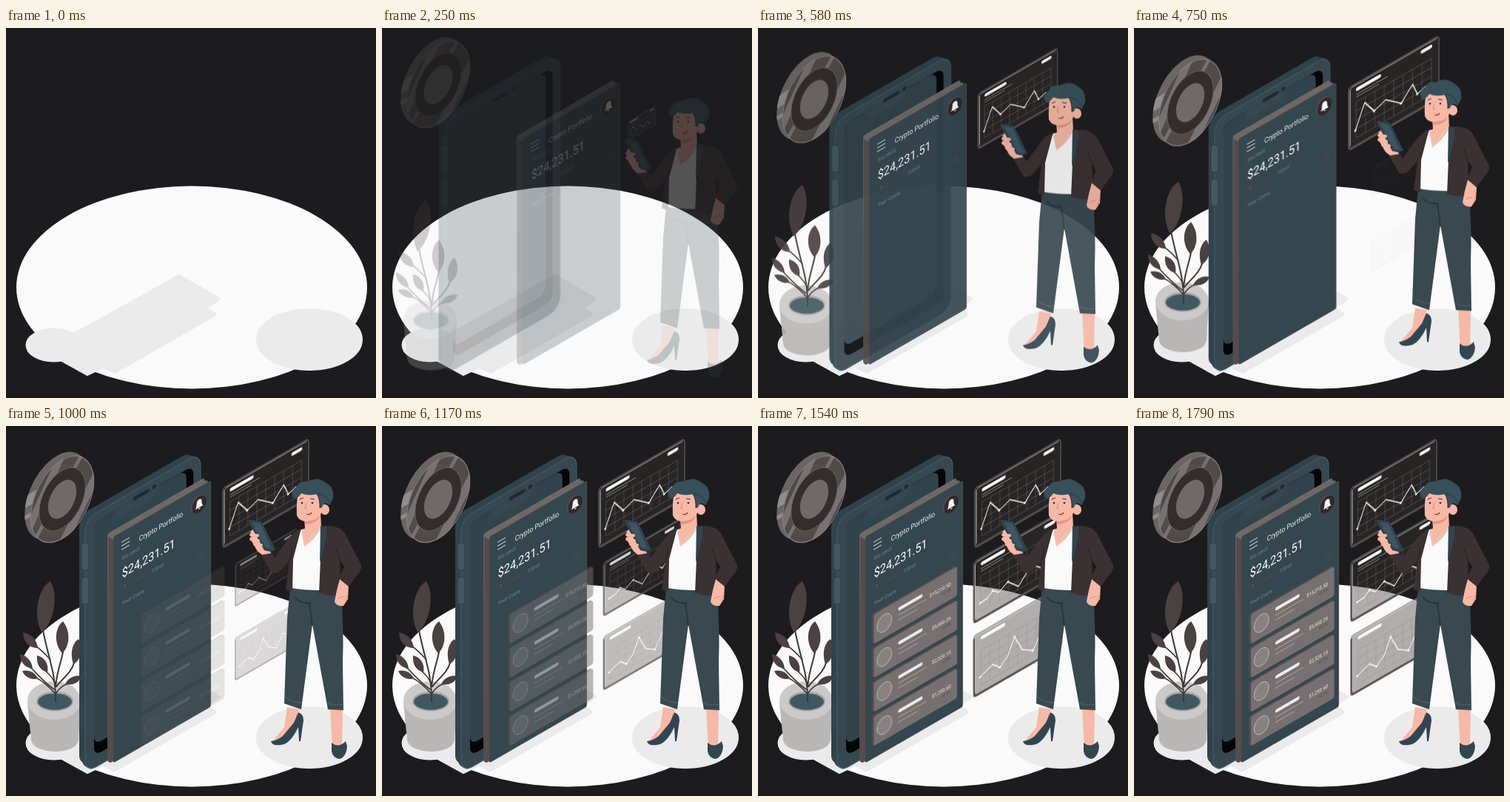
Recreate the animation shown at these times as an HTML page. Size 500x500 px, loop 1830 ms.

```html
<!DOCTYPE html>
<html lang="en">
<head>
<meta charset="utf-8">
<title>Crypto portfolio</title>
<style>
html, body { margin: 0; height: 100%; overflow: hidden; background: #1c1c1e; }
svg { display: block; width: 100vw; height: 100vh; }
text { font-family: Roboto, "Open Sans", sans-serif; }
.enter, .chart-in, .rows-in { animation: enter 1.83s cubic-bezier(.36,-.01,.5,1.38) infinite; }
.chart-in { animation-name: chart-in; }
.rows-in { animation-name: rows-in; }
.up { --from: translate(0, 30px); }
.down { --from: translate(0, -30px); }
.left { --from: translate(-30px, 0); }
.right { --from: translate(60px, 0); }
.rows-in { --from: translate(30px, 0); }
.rise { --from: translate(0, 50px) scale(.1); }
.chart-in { --from: scale(.5); }
@keyframes enter {
  0% { opacity: 0; transform: var(--from); }
  52.5%, 100% { opacity: 1; transform: none; }
}
@keyframes chart-in {
  0%, 35.5% { opacity: 0; transform: var(--from); }
  90%, 100% { opacity: 1; transform: none; }
}
@keyframes rows-in {
  0%, 42.9% { opacity: 0; transform: var(--from); }
  97.5%, 100% { opacity: 1; transform: none; }
}
</style>
</head>
<body>
<svg viewBox="0 0 500 500" preserveAspectRatio="none">
  <rect width="500" height="500" fill="#1c1c1e"/>
  <ellipse cx="251" cy="350.5" rx="237" ry="137" fill="#fafafa"/>
  <g fill="#ebebeb" stroke="#ebebeb" stroke-width="4" stroke-linejoin="round">
    <path d="M234 335 288 366 270 378 283 387 147 465 131 458 110 468 72 447 92 414Z"/>
    <ellipse cx="410" cy="421" rx="70" ry="40"/>
    <ellipse cx="64.500" cy="428.500" rx="36" ry="21"/>
  </g>

  <g class="enter up" id="plant">
    <path d="M29 374 34 424C36 444 95 446 98 424L101 374Z" fill="#b9b7b6"/>
    <ellipse cx="65" cy="371" rx="36" ry="26" fill="#cccac9"/>
    <ellipse cx="66" cy="372" rx="25" ry="13.500" fill="#a9a6a5"/>
    <ellipse cx="66" cy="372.500" rx="23" ry="11" fill="#425860"/>
    <g fill="none" stroke="#40393a" stroke-width="2" stroke-linecap="round">
      <path d="M67 373C68 335 56 310 50 276M67 352C69 330 75 318 77 305M68 352C78 340 89 332 92 320"/>
      <path d="M60 316C53 308 47 302 41 298M66 347C62 338 57 335 54 331M65 356C50 345 40 333 33 326M66 361C54 348 47 343 40 340M67 362C73 352 79 350 84 348" stroke-width="1.600"/>
    </g>
    <g fill="#4a4141">
      <path d="M48 279C34 250 47 215 60 210C70 224 67 264 48 279Z"/>
      <path d="M76 307C64 294 66 272 77 264C88 278 86 298 76 307Z"/>
      <path d="M91 322C86 306 90 293 98 288C106 302 101 316 91 322Z"/>
      <path d="M43 300C30 300 23 290 23 279C36 282 42 290 43 300Z"/>
      <path d="M56 333C45 330 41 321 42 310C53 313 58 322 56 333Z"/>
      <path d="M36 328C25 327 19 318 19 308C29 311 35 318 36 328Z"/>
      <path d="M43 341C34 344 25 339 22 331C32 329 39 333 43 341Z"/>
      <path d="M80 349C84 340 93 336 102 338C99 347 90 351 80 349Z"/>
    </g>
  </g>

  <g class="enter down" id="coin">
    <clipPath id="rim"><circle r="54"/></clipPath>
    <g transform="matrix(.8 -.46 0 1 68.500 94.500)">
      <circle r="54" fill="#6b6665"/>
      <path clip-path="url(#rim)" d="M-60-24H0V-8H-60ZM-60 2H0V8H-60Z" fill="#918d8c"/>
    </g>
    <g transform="matrix(.8 -.46 0 1 76 99)">
      <circle r="53.500" fill="#504a49"/>
      <g clip-path="url(#rim)" fill="#777271">
        <path d="M-60 6-10-60H8L-60 30ZM-60 42 44-60 49-56-60 52ZM-10 60 60-20V4L12 60Z"/>
      </g>
      <circle r="53" fill="none" stroke="#8d8887"/>
      <circle r="39" fill="#332d2d" stroke="#686261"/>
      <circle r="24" fill="#6f6a69"/>
    </g>
  </g>

  <g class="enter left" id="phone">
    <g transform="matrix(.866 -.5 0 1 99 121)">
      <rect width="178" height="341" rx="17" fill="#30434c"/>
    </g>
    <g transform="matrix(.866 -.5 0 1 103 123.500)">
      <rect width="180" height="344" rx="17" fill="#30434c"/>
    </g>
    <g transform="matrix(.866 -.5 0 1 107 126)">
      <rect width="180" height="343" rx="17" fill="#37474f" stroke="#425861" stroke-width="1.500"/>
    </g>
    <g fill="#425861" stroke="#263840" stroke-width=".8">
      <rect x="102" y="158" width="10" height="37" rx="4.500"/>
      <rect x="102" y="204" width="10" height="37" rx="4.500"/>
    </g>
    <g transform="matrix(.866 -.5 0 1 119 131)">
      <rect width="155" height="315" rx="11" fill="#050607"/>
      <rect width="144" height="300" rx="11" fill="#31434b"/>
      <path d="M32 0H100L94 9Q92 12 88 12H44Q40 12 38 9Z" fill="#37474f"/>
      <rect x="61" y="-4" width="25" height="5" rx="2.500" fill="#1d2b32"/>
      <circle cx="94" cy="-2" r="2.800" fill="#1d2b32"/>
    </g>
  </g>

  <g class="enter right" id="panel">
    <g transform="matrix(.866 -.5 0 1 137 145.500)"><rect width="152" height="306" rx="4" fill="#6e6867"/></g>
    <g transform="matrix(.866 -.5 0 1 141 148)"><rect width="152" height="306" rx="4" fill="#6e6867"/></g>
    <path d="M138 150 145 154V453L141 455Q137 454 137 450Z" fill="#544d4c"/>
    <g transform="matrix(.866 -.5 0 1 145 150)">
      <rect width="152" height="305" rx="3" fill="#34464e" stroke="#524a4a"/>
      <path d="M12.700 13.500H25.500M12.700 18.500H25.500M12.700 23.500H25.500" stroke="#e8e8e8"/>
      <text x="40" y="26" font-size="9.800" fill="#f4f4f4">Crypto Portfolio</text>
      <text x="13.500" y="38" font-size="6.500" fill="#77848a">BALANCE</text>
      <text x="13.500" y="62" font-size="16.800" fill="#fff">$24,231.51</text>
      <path d="M15 76 18 71 21 76Z" fill="#654746"/>
      <text x="25" y="78" font-size="7.500" fill="#5c4849">23.60%</text>
      <text x="60" y="79" font-size="6.500" fill="#77848a">TODAY</text>
      <text x="13.500" y="99" font-size="7.300" fill="#7b888d">Your Coins</text>
      <circle cx="135.500" cy="94.500" r="5" fill="none" stroke="#4b4b50"/>
      <circle cx="135.500" cy="94.500" r="1.800" fill="#4b4b50"/>
      <circle cx="132" cy="21" r="11.500" fill="#514b4b"/>
      <circle cx="134" cy="23" r="11" fill="#302a2a"/>
      <path d="M128 27Q130 25 130 21Q130 16 134 16Q138 16 138 21Q138 25 140 27ZM132 28H136Q135 31 132 28Z" fill="#fff"/>
    </g>
  </g>
  <g class="rows-in" id="rows"></g>
  <g id="charts"></g>

  <g class="enter up" id="woman">
    <path d="M380 380 396 383 390 402 374 421 360 430 362 424 376 407Z" fill="#f8b8a6"/>
    <path d="M438 381H455L454 436 441 434Z" fill="#f8b8a6"/>
    <path d="M358 426Q366 425 374 419L389 401 395 387Q402 389 402 398L398 426H396L395 407Q386 426 376 430Q360 434 358 426Z" fill="#324650"/>
    <path d="M440 428Q449 436 459 426L461 433Q460 447 451 450Q442 449 440 440Z" fill="#324650"/>
    <path d="M384 218H452Q457 270 455 320L456 384 435 383 414 268 399 383 376 375 380 260Z" fill="#38494f"/>
    <path d="M377 366Q388 374 400 374M434 374Q445 379 456 376" fill="none" stroke="#51646d"/>
    <path d="M390 231Q396 240 410 239L414 270" fill="none" stroke="#27373f" stroke-width="2"/>
    <path d="M399 140 424 134 431 160 425 222Q402 222 386 219L388 160Z" fill="#fafafa"/>
    <path d="M403 124 425 116 426 137Q417 154 403 163L399 143 404 138Z" fill="#f8b8a6"/>
    <path d="M399 141 404 162 425 136" fill="none" stroke="#d8d8d8"/>
    <path d="M399 138Q388 143 379 156L363 178 352 160 345 175 358 197Q363 201 370 196L383 182 378 221 387 224 388 180Z" fill="#3a3232"/>
    <path d="M425 135 441 135Q456 138 460 149L480 188Q481 194 475 201L463 217 450 207 457 190 451 180 453 228Q440 231 423 226L425 180Z" fill="#3a3232"/>
    <path d="M425 135 433 136Q434 158 424 184Z" fill="#30444d"/>
    <path d="M451 180 446 166M383 182 387 169" stroke="#262020" fill="none"/>
    <path d="M451 207 463 217 462 234 456 243Q446 244 444 237L447 222Z" fill="#f8b8a6"/>
    <path d="M448 233 457 230M459 237 462 227" stroke="#dc8f7c" fill="none"/>
    <path d="M334 140Q343 144 350 153L358 172 346 174Q338 169 336 162L330 153Q329 149 334 149L330 143Z" fill="#f8b8a6"/>
    <path d="M328 130Q327 127 330 127L344 129 347 132 364 167 358 170 349 168Z" fill="#30444d"/>
    <path d="M332 130 344 132 359 166 351 165Z" fill="#3d5560"/>
    <path d="M331 147 340 148M331 153 341 155M336 160 345 161" stroke="#f8b8a6" stroke-width="4" stroke-linecap="round"/>
    <path d="M395 88Q392 105 393 121Q397 130 409 129Q422 126 428 115L432 92 412 80Z" fill="#f8b8a6"/>
    <ellipse cx="431" cy="113" rx="6" ry="7" fill="#f8b8a6"/>
    <path d="M389 98Q383 88 393 82Q397 73 408 75Q421 67 433 77Q444 83 442 98L437 107Q430 101 427 110L424 111Q424 99 420 92Q408 95 399 91Q395 98 389 98Z" fill="#38505a"/>
    <path d="M420 92Q425 99 424 111M421 91Q434 93 437 104" stroke="#263b44" fill="none"/>
    <circle cx="400" cy="104" r="1.300" fill="#263238"/>
    <circle cx="414" cy="104" r="1.300" fill="#263238"/>
    <path d="M397 99 402 97M411 98 417 99" stroke="#263238" fill="none"/>
    <path d="M406 104 404 111 407 112" stroke="#d98774" fill="none"/>
    <path d="M406 119Q410 121 413 117" stroke="#8d3f37" stroke-width="1.300" fill="none"/>
    <path d="M404 129Q417 129 425 121Q420 132 405 133Z" fill="#e5937f"/>
  </g>
</svg>
<script>
const iso = (x, y, body) => `<g transform="matrix(.866 -.5 0 1 ${x} ${y})">${body}</g>`;
const bar = (x, y, w, h, fill) =>
  `<rect x="${x}" y="${y}" width="${w}" height="${h}" rx="${h / 2}" fill="${fill}"/>`;

function row(price, i) {
  const y = 254 + i * 46;
  const side = iso(155, y, '<rect width="131" height="41" rx="3" fill="#514b4b"/>');
  return side + iso(158, y + 0.5, `
    <rect width="130" height="40" rx="3" fill="#767170"/>
    <circle cx="16.5" cy="20" r="11.5" fill="#878281" stroke="#c9c5c4" stroke-width=".8"/>
    ${bar(38, 10, 38, 4.5, '#ecebeb')}
    ${bar(38, 20, 44, 1, '#aaa6a5')}${bar(38, 26.5, 30, 1, '#aaa6a5')}
    <text x="120" y="21" font-size="6.7" text-anchor="end" fill="#f4f4f4">${price}</text>
    <text x="120" y="28" font-size="5.5" text-anchor="end" fill="#4b4544">+2.4%</text>`);
}

const steps = (from, to, by) =>
  Array.from({ length: Math.floor((to - from) / by) + 1 }, (_, i) => from + i * by);

function chart(line, i) {
  const y = 84 + i * 100;
  const grid = steps(11, 123, 14).map(x => `M${x} 24V70`).join('') +
    steps(24, 70, 11.5).map(v => `M11 ${v}H123`).join('');
  const dots = line.filter((_, k) => k % 2 === 0)
    .map(([x, v]) => `<circle cx="${x}" cy="${v}" r="1.6"/>`).join('');
  const body = iso(293, y, `
    <rect width="134" height="81" rx="4" fill="#37302e" fill-opacity=".38" stroke="#8a8584" stroke-width=".8"/>
    <path d="M1 4V77Q1 80 4 80H132" fill="none" stroke="#554e4d" stroke-width="3"/>
    <path d="M2.500 76V6Q2.500 2 7 2H131" fill="none" stroke="#d5d2d1" stroke-width=".8"/>
    ${bar(11, 6, 37, 4.5, '#fff')}${bar(107, 6, 17, 4.5, '#fff')}
    ${bar(11, 14, 47, 0.8, '#aaa5a4')}${bar(11, 17.5, 34, 0.8, '#aaa5a4')}
    <path d="${grid}" stroke="#8d8786" stroke-opacity=".55" stroke-width=".7" fill="none"/>
    <polyline points="${line.join(' ')}" fill="none" stroke="#fff" stroke-width="1.3" stroke-linejoin="round"/>
    <g fill="#fff">${dots}</g>`);
  return `<g class="${i ? 'chart-in' : 'enter rise'}" style="transform-origin:351px ${y + 7.5}px">${body}</g>`;
}

const lines = [
  [[10, 60], [24, 31], [38, 49], [55, 43], [78, 59], [95, 43], [102, 59], [115, 55]],
  [[10, 59], [22, 58], [29, 52], [38, 59], [52, 52], [68, 66], [82, 53], [91, 50], [103, 59], [118, 46]],
  [[10, 59], [29, 52], [40, 61], [52, 52], [62, 32], [74, 55], [90, 64], [104, 44], [118, 52]]
];
const prices = ['$15,210.50', '$5,450.26', '$2,320.15', '$1,250.60'];

document.getElementById('rows').innerHTML = prices.map(row).join('');
document.getElementById('charts').innerHTML = lines.map(chart).join('');
</script>
</body>
</html>
```
